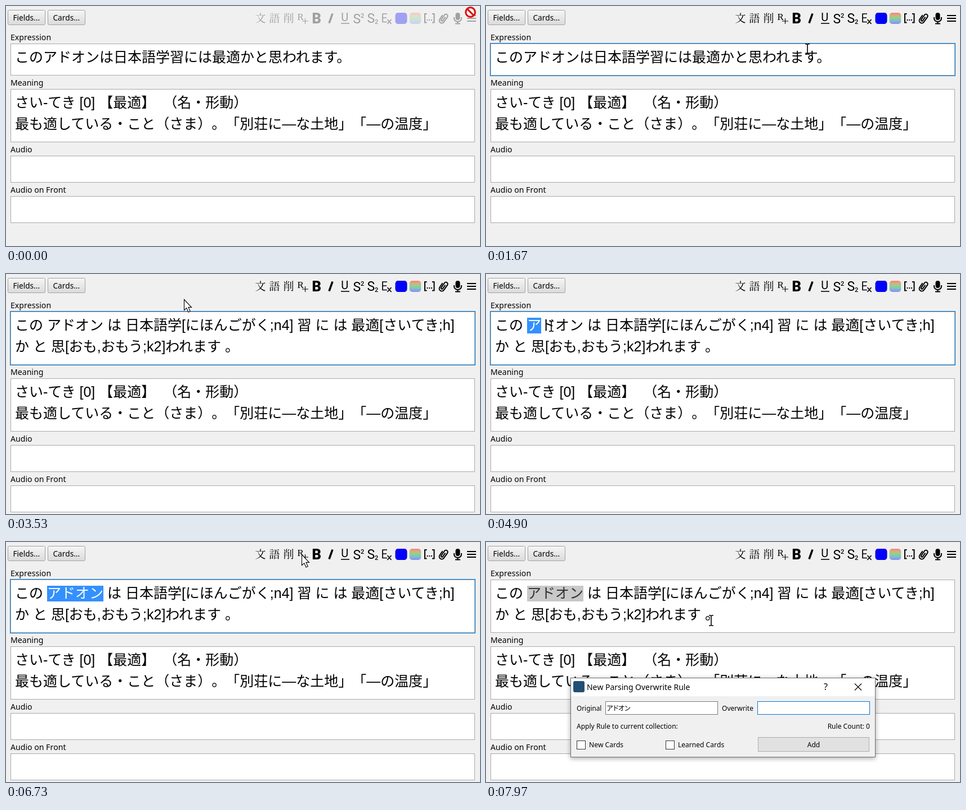
An HTML page for the animation above (8000 ms loop, 842 px wide and 428 px high).

```html
<!DOCTYPE html>
<html lang="ja">
<head>
<meta charset="utf-8">
<title>Card editor</title>
<style>
html, body { margin: 0; width: 100%; height: 100%; overflow: hidden; background: #f0f0f0; }
svg { display: block; width: 842px; height: 428px; }
text {
  font: 14.1px "Noto Sans", "Open Sans", sans-serif; white-space: pre; font-kerning: none;
  text-spacing-trim: space-all; text-autospace: no-autospace;
}
.btn { font-size: 13.6px; text-anchor: middle; }
.jp { font: 300 25px "Liberation Sans", "Noto Sans CJK JP", "Noto Sans CJK", sans-serif; }
.ico text { font-family: Roboto, sans-serif; }
.ico .kanji {
  font: 19px "Noto Serif CJK JP", "Noto Sans CJK JP", "Noto Sans CJK", serif; text-anchor: middle;
}
.line { fill: none; stroke: #000; stroke-width: 2; }
.box { fill: #fff; stroke: #a9a9a9; }
#dialog { transform-origin: 421px 313px; }
#dialog text { font-size: 12.05px; }
#dialog .title { font-size: 13.95px; }
</style>
</head>
<body>
<svg viewBox="0 0 842 428">
  <defs>
    <linearGradient id="face" x2="0" y2="1">
      <stop stop-color="#f6f6f6"/><stop offset="1" stop-color="#dadada"/>
    </linearGradient>
    <linearGradient id="rainbow" x2="0" y2="1">
      <stop stop-color="#f88080"/><stop offset=".25" stop-color="#d8b080"/>
      <stop offset=".5" stop-color="#80d890"/><stop offset=".75" stop-color="#80b8d0"/>
      <stop offset="1" stop-color="#9088f8"/>
    </linearGradient>
  </defs>

  <g fill="url(#face)" stroke="#a3a3a3">
    <rect x="3.5" y="7.5" width="66" height="26" rx="2"/>
    <rect x="74.5" y="7.5" width="66" height="26" rx="2"/>
  </g>
  <text class="btn" x="36.3" y="25.5">Fields...</text>
  <text class="btn" x="107.3" y="25.5">Cards...</text>

  <g id="tools" class="ico">
    <text class="kanji" x="452" y="29">文</text>
    <text class="kanji" x="477" y="29">語</text>
    <text class="kanji" x="502" y="29">削</text>
    <text x="517.5" y="25" style="font:17px 'Liberation Serif',serif">R</text>
    <path class="line" d="M526 27H537M531.5 22V32" style="stroke-width:1.1"/>
    <text x="543.5" y="31" style="font-size:25.5px;font-weight:900">B</text>
    <path class="line" d="M580 13.5L574 30.5" style="stroke-width:3.6"/>
    <text x="595.3" y="27" style="font-size:20px">U</text>
    <path class="line" d="M595 31H610" style="stroke-width:1.6"/>
    <text x="616.5" y="30.5" style="font-size:23px">S</text>
    <text x="630" y="21" style="font-size:11px;font-weight:500">2</text>
    <text x="641.5" y="30" style="font-size:23px">S</text>
    <text x="655" y="32" style="font-size:11px;font-weight:500">2</text>
    <path class="line" d="M677 14H669V28.5H677M669 21H676M677.5 24L684.5 32M684.5 24L677.5 32" style="stroke-width:1.7"/>
    <rect x="691.7" y="12" width="20.6" height="20" rx="5"/>
    <rect x="691.7" y="12" width="20.6" height="20" rx="5" fill="#00f"/>
    <rect x="716.7" y="12" width="20.6" height="20" rx="5" fill="url(#rainbow)"/>
    <path class="line" d="M747.5 14H744V29.5H747.5M757 14H760.5V29.5H757"/>
    <path class="line" d="M747.5 25h2M751.3 25h2M755 25h2"/>
    <path class="line" transform="translate(777 22) rotate(35)" d="M-4.5-4V5A4.5 4.5 0 0 0 4.5 5V-6A3.2 3.2 0 0 0-1.9-6V4A1.5 1.5 0 0 0 1.4 4V-4"/>
    <rect x="798.5" y="12" width="8" height="13" rx="4"/>
    <path class="line" d="M796 20V22A6.5 6 0 0 0 809 22V20M802.5 28V31M798 31.5H807"/>
    <path class="line" d="M819 17H835M819 22H835M819 27H835"/>
  </g>

  <g id="fields"></g>
  <rect id="focus" x="7.5" y="66.5" width="826" fill="none" stroke="#0078d7"/>
  <rect id="sel" x="73" y="78" height="28"/>
  <text id="plain" class="jp" x="16" y="100">このアドオンは日本語学習には最適かと思われます。</text>
  <g id="parsed">
    <text class="jp" x="16" y="100">この <tspan>ア</tspan><tspan>ド</tspan><tspan>オ</tspan><tspan>ン</tspan> は 日本語学[にほんごがく;n4] 習 に は 最適[さいてき;h]</text>
    <text class="jp" x="16" y="138">か と 思[おも,おもう;k2]われます 。</text>
  </g>
  <rect id="caret" width="1.2" height="28"/>

  <g id="dialog">
    <rect x="150.5" y="242.5" width="541" height="141" fill="#f0f0f0" stroke="#707070" style="filter:drop-shadow(0 2px 4px rgba(0,0,0,.35))"/>
    <rect x="151" y="243" width="540" height="32" fill="#fff"/>
    <rect x="155" y="248" width="20" height="20" rx="3" fill="#234f74"/>
    <text class="title" x="179" y="263.5">New Parsing Overwrite Rule</text>
    <text x="600" y="264" style="font-size:16px">?</text>
    <path class="line" d="M655 252.5L667 264.5M667 252.5L655 264.5" style="stroke-width:1.2"/>
    <text x="161" y="301" style="font-size:11.8px">Original</text>
    <rect x="212.5" y="284.5" width="199" height="23" fill="#fff" stroke="#7a7a7a"/>
    <text x="214" y="301" style="font:12px 'Noto Sans CJK JP','Noto Sans CJK',sans-serif;letter-spacing:-1.6px">アドオン</text>
    <text x="419" y="301">Overwrite</text>
    <rect x="482.5" y="284.5" width="199" height="23" fill="#fff" stroke="#0078d7"/>
    <rect id="caret2" x="485" y="288" width="1" height="16"/>
    <text x="161" y="333">Apply Rule to current collection:</text>
    <text x="682" y="333" text-anchor="end">Rule Count: 0</text>
    <g fill="#fff" stroke="#333">
      <rect x="161.5" y="354.5" width="15" height="15"/>
      <rect x="319.5" y="354.5" width="15" height="15"/>
    </g>
    <text x="183" y="366">New Cards</text>
    <text x="341" y="366">Learned Cards</text>
    <rect x="483.5" y="348.5" width="197" height="25" fill="#e1e1e1" stroke="#adadad"/>
    <text x="582" y="366" text-anchor="middle">Add</text>
  </g>

  <g id="pointer">
    <path id="arrow" d="M.5-.5V18.5L4.8 14.6L8 22L11.2 20.5L8 13.4H13.5Z" fill="#fff" stroke="#000" stroke-width="1.1"/>
    <path id="beam" class="line" d="M-4-9.2H-1.5L0-8.2L1.5-9.2H4M-4 9.2H-1.5L0 8.2L1.5 9.2H4M0-8.2V8.2" style="stroke-width:1.6"/>
    <g id="stop" fill="#fff" stroke="#dc1414" stroke-width="3.2">
      <circle r="8.3"/><path d="M-5.8-5.8L5.8 5.8"/>
    </g>
  </g>
</svg>
<script>
const $ = id => document.getElementById(id);
const set = (id, attrs) => { for (const k in attrs) $(id).setAttribute(k, attrs[k]); };
const show = (id, on) => { $(id).style.display = on ? '' : 'none'; };
const clamp = (v, lo, hi) => Math.min(hi, Math.max(lo, v));

const field = (label, y, h, id = '') =>
  `<text x="8" y="${y - 6.5}">${label}</text>
   <rect class="box" id="${id}" x="8.5" y="${y}" width="824" height="${h}"/>`;
$('fields').innerHTML = field('Expression', 67.5, 56, 'expr') + `<g id="lower">
  ${field('Meaning', 148.5, 94)}${field('Audio', 267.5, 47)}${field('Audio on Front', 339.5, 47)}
  <text class="jp" x="16" y="181">さい-てき [0] 【最適】\u00a0\u00a0（名・形動）</text>
  <text class="jp" x="16" y="219">最も適している・こと（さま）。「別荘に―な土地」「―の温度」</text></g>`;
const kana = document.querySelectorAll('tspan');

// Pointer stops: time, x, y
const path = [
  [0, 825, 11], [830, 665, 101], [1150, 665, 101], [1670, 571, 77], [1970, 496, 42],
  [2470, 445, 23], [3240, 445, 23], [3530, 316, 46], [4070, 124, 88], [4350, 79, 89],
  [4470, 79, 90], [4900, 116, 93], [5470, 169, 92], [5700, 169, 92], [6000, 311, 62],
  [6530, 510, 27], [6730, 525, 23], [7640, 525, 23], [7970, 400, 140], [8000, 400, 140]
];

// Slope at a stop; zero where the pointer rests
function slope(i, c) {
  const a = path[i - 1], p = path[i], b = path[i + 1];
  if (!a || !b || (p[c] - a[c]) * (b[c] - p[c]) <= 0) return 0;
  return (b[c] - a[c]) / (b[0] - a[0]);
}

function pointerAt(t) {
  let i = 0;
  while (i < path.length - 2 && t >= path[i + 1][0]) i++;
  const p = path[i], q = path[i + 1], d = q[0] - p[0], u = (t - p[0]) / d, v = 1 - u;
  return [1, 2].map(c =>
    p[c] * v * v * (1 + 2 * u) + q[c] * u * u * (3 - 2 * u) +
    d * u * v * (slope(i, c) * v - slope(i + 1, c) * u));
}

function draw(t) {
  const active = t >= 1030, parsed = t >= 2870, dialog = t >= 7270;
  const grow = parsed ? 38 : 0;

  $('tools').style.opacity = active ? 1 : .33;
  show('plain', !parsed);
  show('parsed', parsed);
  set('expr', { height: 56 + grow });
  set('lower', { transform: `translate(0 ${grow})` });
  set('focus', { height: 58 + grow });
  show('focus', active && !dialog);

  // Selection trails the drag slightly
  const n = t < 4470 ? 0 : t > 5470 ? 4 : clamp(Math.round((pointerAt(t - 100)[0] - 73) / 25), 0, 4);
  set('sel', { width: 25 * n, fill: dialog ? '#c8c8c8' : '#3390ff' });
  kana.forEach((k, i) => k.setAttribute('fill', i >= n ? '#000' : dialog ? '#323232' : '#fff'));

  const within = (a, b) => t >= a && t < b;
  show('caret', within(1030, 1530) || within(2060, 3400) || within(3930, 4470) || t >= 4470 && !n);
  set('caret', t >= 4470 ? { x: 73, y: 78 } : parsed ? { x: 415.5, y: 116 } : { x: 615.5, y: 78 });

  show('dialog', dialog);
  const e = 1 - (1 - clamp((t - 7240) / 230, 0, 1)) ** 3;
  $('dialog').style.opacity = e;
  $('dialog').style.transform = `scale(${.94 + .06 * e})`;
  show('caret2', t < 7800);

  const [x, y] = pointerAt(t);
  const blocked = !active && y < 34, typing = y > 67;
  show('stop', blocked);
  show('beam', typing);
  show('arrow', !blocked && !typing);
  set('pointer', { transform: `translate(${Math.round(x)} ${Math.round(y)})` });
}

const start = performance.now();
function tick() {
  draw((performance.now() - start) % 8000);
  requestAnimationFrame(tick);
}
draw(0);
requestAnimationFrame(tick);
</script>
</body>
</html>
```
